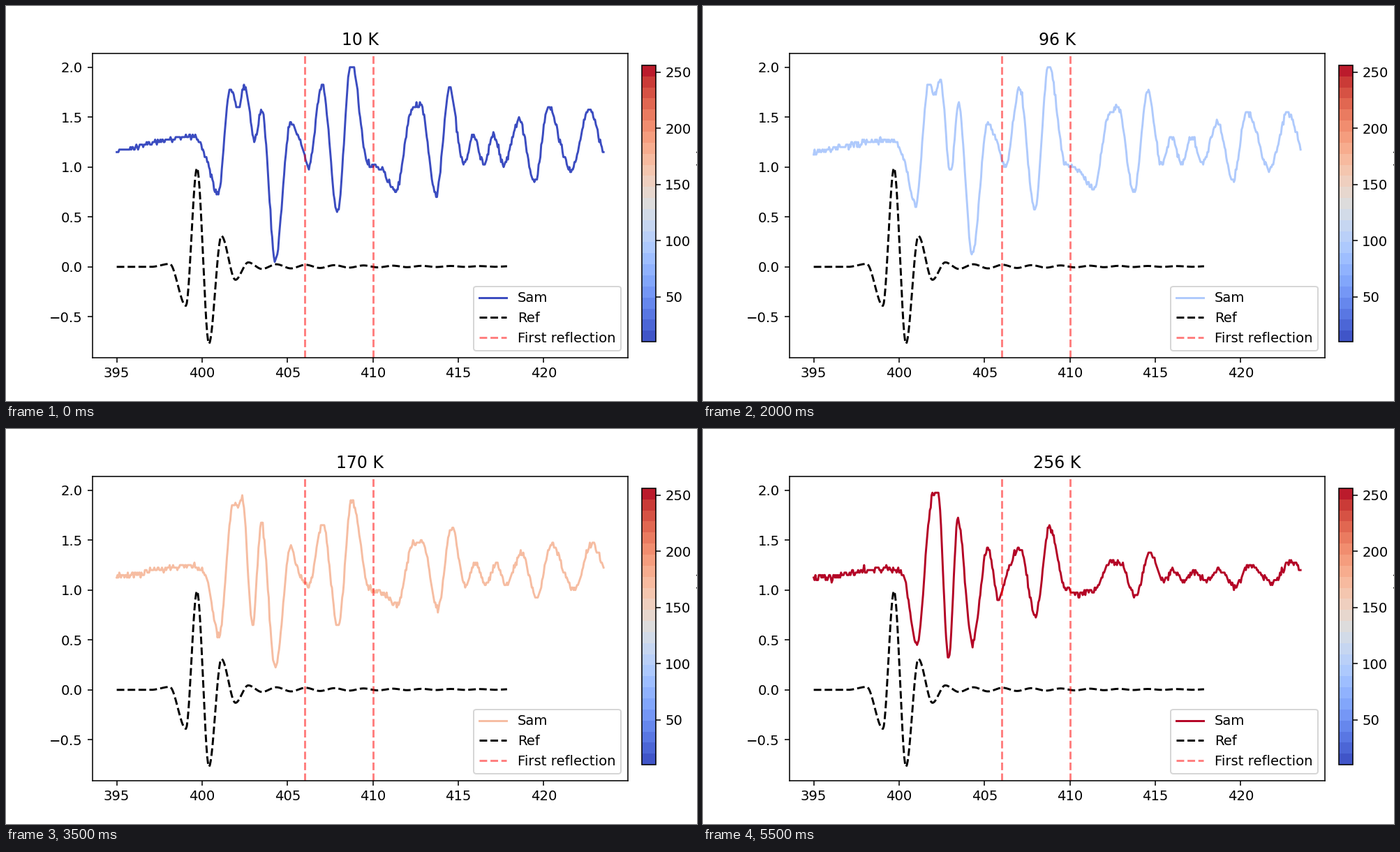
A matplotlib script that plays this animation: 990 by 566 pixels, repeating every 6000 ms.

```python
import numpy as np
import matplotlib.pyplot as plt
from matplotlib.animation import FuncAnimation
from matplotlib.cm import ScalarMappable
from matplotlib.colors import ListedColormap, Normalize

WIDTH, HEIGHT = 990, 566
DPI = WIDTH / 7
TEMPS = [10, 11, 24, 68, 96, 124, 147, 170, 191, 213, 234, 256]
BANDS = 25
BASELINE = 1.13
ROUND_TRIP = 5.77
STEP, NOISE = 0.025, 0.016

# Key turning points: time, height when cold, height when warm.
PULSE = [(395, 1.16, 1.11), (399.5, 1.31, 1.21), (400.2, 1.11, 1.16),
         (400.93, 0.72, 0.46), (401.64, 1.80, 1.90), (402.1, 1.60, 1.97),
         (402.5, 1.81, 2.00), (403.07, 1.28, 0.30), (403.5, 1.59, 1.71),
         (404.28, 0.08, 0.47), (405.17, 1.44, 1.41), (405.8, 1.23, 0.92),
         (406.22, 1.00, 1.13), (409.7, 1.03, 1.00), (410.4, 0.99, 0.97)]
REFLECTION = [(407.03, 1.83, 1.42), (407.92, 0.55, 0.74), (408.73, 2.08, 1.62)]
# Later ringing: time, height when cold.
RINGING = [(411.35, 0.76), (412.25, 1.57), (421.6, 0.96), (422.65, 1.58), (423.5, 1.13)]
REF_PULSE = [(395, 0), (397, 0), (398.1, 0.03), (399.05, -0.39), (399.7, 0.99),
             (400.4, -0.77), (401.13, 0.31), (401.95, -0.13), (402.7, 0.045)]


def monotone_cubic(x, xk, yk):
    """Cubic Hermite curve through the knots without overshoot."""
    xk, yk = np.asarray(xk, float), np.asarray(yk, float)
    h = np.diff(xk)
    d = np.diff(yk) / h
    left, right = d[:-1], d[1:]
    same = left * right > 0
    slope = np.concatenate([[d[0]], np.zeros(len(left)), [d[-1]]])
    slope[1:-1][same] = 2 / (1 / left[same] + 1 / right[same])
    i = np.clip(np.searchsorted(xk, x, side="right") - 1, 0, len(h) - 1)
    t = (x - xk[i]) / h[i]
    return ((1 + 2 * t) * (1 - t) ** 2 * yk[i] + t * t * (3 - 2 * t) * yk[i + 1]
            + h[i] * t * (1 - t) * ((1 - t) * slope[i] - t * slope[i + 1]))


def damped(height, factor):
    return BASELINE + (height - BASELINE) * factor


def sample_turns():
    """Pulse, its reflection, the weaker echoes and the ripple between them."""
    turns = PULSE + REFLECTION
    for trip in (1, 2):
        turns += [(t + trip * ROUND_TRIP, damped(cold, 0.7 ** trip), damped(warm, 0.5 ** trip))
                  for t, cold, warm in REFLECTION]
    ripple = [(415.3 + 0.59 * k, 1.17 - 0.14 * (-1) ** k) for k in range(5)]
    turns += [(t, cold, damped(cold, 0.35)) for t, cold in RINGING + ripple]
    return np.array(sorted(turns)).T


def sample_trace(x, temp):
    t, cold, warm = sample_turns()
    u = norm(temp)
    # The pulse changes steadily; what follows fades mostly near the warm end.
    progress = u ** np.where(t < 404, 1.0, 2.2)
    gap = 402.1 - t
    squeeze = 0.75 * gap * np.exp(-1.5 * gap ** 2)
    delay = 0.015 * np.maximum(t - 404, 0)
    y = monotone_cubic(x, t + u * (squeeze + delay), cold + (warm - cold) * progress)
    y += np.random.default_rng(temp).normal(0, NOISE, len(x))
    return np.minimum(STEP * np.round(y / STEP), 2)


def reference_trace(x):
    ripple = [(403.5 + 0.85 * k, 0.004 - 0.025 * (-1) ** k * np.exp(-k / 8))
              for k in range(18)]
    return monotone_cubic(x, *zip(*(REF_PULSE + ripple)))


plt.rcParams["font.family"] = "DejaVu Sans"
fig, ax = plt.subplots(figsize=((WIDTH + 1e-6) / DPI, (HEIGHT + 1e-6) / DPI), dpi=DPI)
norm = Normalize(TEMPS[0], TEMPS[-1])
coolwarm = plt.get_cmap("coolwarm")

time = np.linspace(395, 423.5, 571)
ref_time = np.arange(395, 417.9, 0.05)
sample, = ax.plot(time, sample_trace(time, TEMPS[0]), label="Sam")
ax.plot(ref_time, reference_trace(ref_time), "k--", label="Ref")
ax.axvline(406, color="red", ls="--", alpha=0.5, label="First reflection")
ax.axvline(410, color="red", ls="--", alpha=0.5)
ax.set_xlim(393.575, 424.925)
ax.set_ylim(-0.9085, 2.1385)
title = ax.set_title("")
legend = ax.legend(loc="lower right")

bands = ListedColormap(coolwarm((np.arange(BANDS) + 0.5) / BANDS))
fig.colorbar(ScalarMappable(norm, bands), cax=fig.add_axes([0.92, 0.15, 0.02, 0.7]),
             label="Temperature (K)")


def update(frame):
    temp = TEMPS[frame]
    color = coolwarm(norm(temp))
    sample.set_ydata(sample_trace(time, temp))
    sample.set_color(color)
    legend.get_lines()[0].set_color(color)
    title.set_text(f"{temp} K")
    return sample, title, legend


anim = FuncAnimation(fig, update, frames=len(TEMPS), interval=500,
                     repeat=True, repeat_delay=0, blit=False)
plt.show()
```
